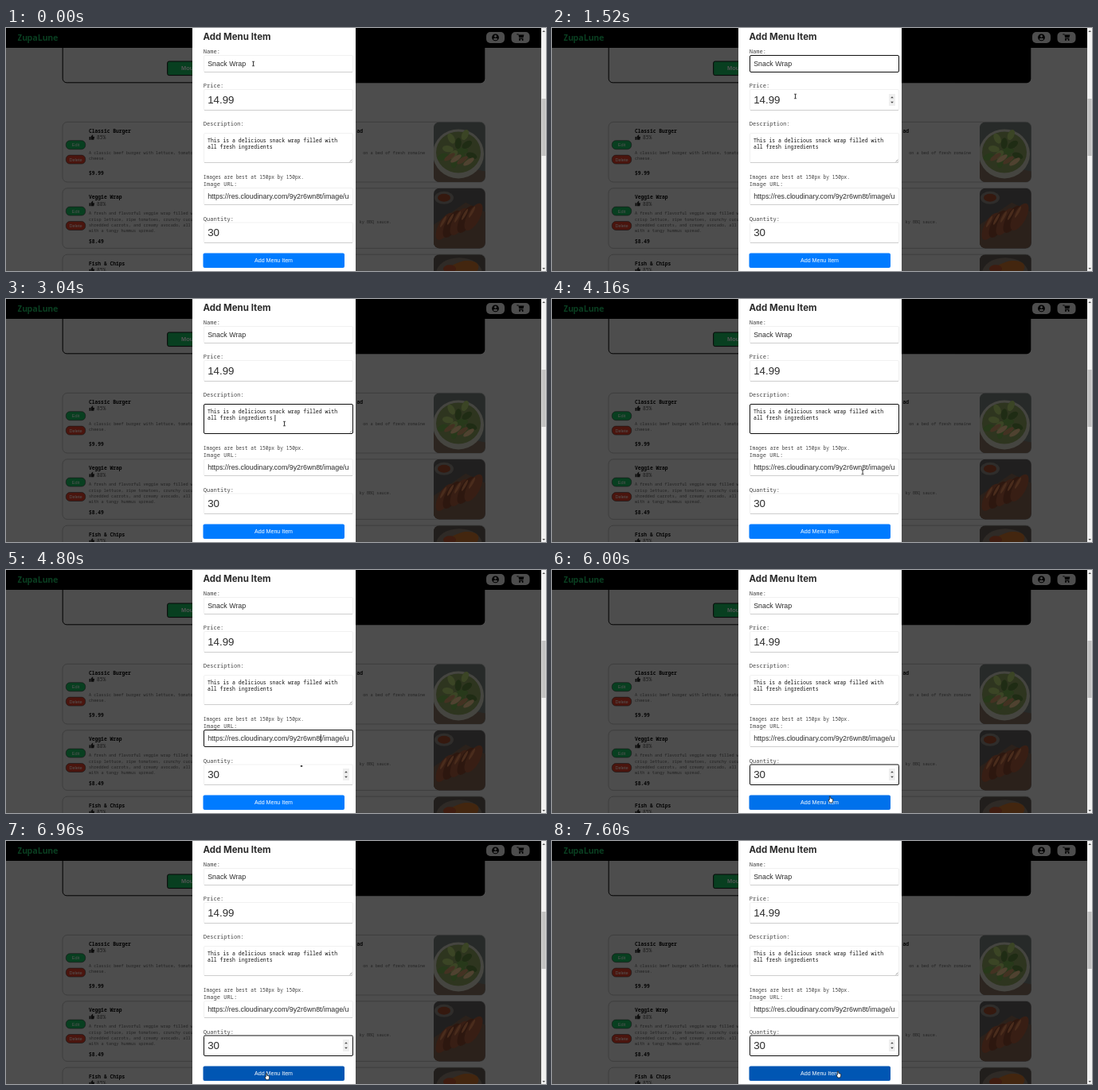
Animation, 678 px wide and 306 px high, one loop 8 s. Source, as an HTML page with a canvas:

```html
<!DOCTYPE html>
<html lang="en">
<head>
<meta charset="utf-8">
<title>Add Menu Item</title>
<style>
html, body { margin: 0; width: 100%; height: 100%; overflow: hidden; background: #4d4d4d; }
canvas { display: block; width: 678px; height: 306px; }
</style>
</head>
<body>
<canvas id="stage" width="678" height="306"></canvas>
<script>
const LOOP = 8000, STEP = 80;
const MONO = '"Noto Sans Mono", "DejaVu Sans Mono", monospace';
const SANS = '"Liberation Sans", Arial, sans-serif';
const DIM = '#4d4d4d', INK = '#040404', SOFT = '#222', GREEN = '#083f20', RED = '#4a150e';
const ctx = document.getElementById('stage').getContext('2d');

function rect(x, y, w, h, color) {
  ctx.fillStyle = color;
  ctx.fillRect(x, y, w, h);
}

function roundRect(x, y, w, h, r, fill, stroke, line = 1) {
  ctx.beginPath();
  ctx.roundRect(x, y, w, h, r);
  if (fill) { ctx.fillStyle = fill; ctx.fill(); }
  if (stroke) { ctx.strokeStyle = stroke; ctx.lineWidth = line; ctx.stroke(); }
}

function ellipse(x, y, rx, ry, color, turn = 0) {
  ctx.beginPath();
  ctx.ellipse(x, y, rx, ry, turn, 0, Math.PI * 2);
  ctx.fillStyle = color;
  ctx.fill();
}

function poly(points, color) {
  ctx.beginPath();
  points.forEach(([x, y]) => ctx.lineTo(x, y));
  ctx.closePath();
  ctx.fillStyle = color;
  ctx.fill();
}

function text(str, x, y, size, family, color, weight = 400, align = 'left') {
  ctx.font = `${weight} ${size}px ${family}`;
  ctx.textAlign = align;
  ctx.fillStyle = color;
  ctx.fillText(str, x, y);
}

function arrow(x, y, w, h, color) {
  poly([[x - w, y + h], [x + w, y + h], [x, y - h]], color);
}

// ---- dimmed page behind the dialog ----

const cards = [
  { name: 'Classic Burger', score: '85%', price: '$9.99',
    lines: ['A classic beef burger with lettuce, tomato, and', 'cheese.'],
    title: 'ad', tail: 'on a bed of fresh romaine', end: 526, tailY: 158.5 },
  { name: 'Veggie Wrap', score: '88%', price: '$8.49',
    lines: ['A fresh and flavorful veggie wrap filled with',
            'crisp lettuce, ripe tomatoes, crunchy cucumbers,',
            'shredded carrots, and creamy avocado, all topped',
            'with a tangy hummus spread.'],
    title: '', tail: 'ky BBQ sauce.', end: 484, tailY: 245.5 },
  { name: 'Fish & Chips', score: '85%', price: '', lines: [], title: '', tail: '' }
];

function thumbUp(x, y) {
  rect(x, y + 2.2, 1.5, 3.8, '#0c0c0c');
  poly([[x + 2, y + 2.2], [x + 4, y - 0.4], [x + 4.9, y + 0.3], [x + 4.4, y + 2],
        [x + 6.6, y + 2.2], [x + 5.8, y + 6], [x + 2, y + 6]], '#0c0c0c');
}

function pill(label, y, color) {
  roundRect(75.3, y, 24.4, 11, 5, color, '#161616', 0.6);
  text(label, 87.5, y + 7.6, 5.6, SANS, '#555', 400, 'center');
}

function salad(x, y) {
  rect(x, y, 65, 76, '#272a29');
  poly([[x, y + 50], [x + 65, y + 62], [x + 65, y + 76], [x, y + 76]], '#2c2520');
  ellipse(x + 31, y + 40, 32, 31, '#454540');
  ellipse(x + 31, y + 38, 28, 26, '#2e351f');
  for (let i = 0; i < 11; i++) {
    const a = i * 2.4, r = 6 + i * 1.6;
    ellipse(x + 30 + r * Math.cos(a), y + 36 + r * Math.sin(a), 7, 4,
            ['#27391a', '#3b4525', '#1f2c14'][i % 3], a);
  }
  for (let i = 0; i < 4; i++) ellipse(x + 20 + i * 8, y + 44 + i * 2, 8, 3, i % 2 ? '#4f4230' : '#433222', -0.6);
}

function ribs(x, y) {
  rect(x, y, 65, 76, '#201f1f');
  poly([[x, y + 46], [x + 40, y + 18], [x + 65, y + 30], [x + 65, y + 76], [x, y + 76]], '#2b211b');
  for (let i = 0; i < 5; i++) {
    ellipse(x + 14 + i * 9, y + 48 - i * 3, 8, 19, i % 2 ? '#2d170f' : '#381e14', 0.5);
    ellipse(x + 12 + i * 9, y + 42 - i * 3, 1.6, 8, '#4a2c1c', 0.5);
  }
  ellipse(x + 13, y + 12, 12, 8, '#2f2d2b');
  ellipse(x + 13, y + 12, 8, 5, '#35190f');
}

function fish(x, y) {
  rect(x, y, 65, 76, '#211e1c');
  ellipse(x + 32, y + 24, 29, 20, '#2f2a26');
  ellipse(x + 36, y + 20, 21, 11, '#43260f', -0.3);
  ellipse(x + 20, y + 18, 8, 5, '#3f1c10');
}

const photos = [salad, ribs, fish];

function card(c, i) {
  const y = 118.4 + i * 83.4;
  roundRect(71, y, 262, 75.6, 6, null, '#3a3a3a', 0.8);
  roundRect(340, y, 261.5, 75.6, 6, null, '#3a3a3a', 0.8);
  text(c.name, 104, y + 13.3, 6.3, MONO, INK, 700);
  thumbUp(104.5, y + 16.4);
  text(c.score, 114, y + 21.8, 6.3, MONO, '#1a1a1a');
  pill('Edit', y + 23.3, GREEN);
  pill('Delete', y + 41.7, RED);
  const top = i ? y + 33.6 : y + 40.4;
  c.lines.forEach((line, n) => text(line, 104, top + n * 7.1, 5.2, MONO, SOFT));
  text(c.price, 104, y + (i ? 69.5 : 67), 6.3, MONO, INK, 700);
  text(c.title, 448, y + 13.3, 6.3, MONO, INK, 700, 'right');
  text(c.tail, c.end, c.tailY || 0, 5.2, MONO, SOFT, 400, 'right');
  ctx.save();
  ctx.beginPath();
  ctx.roundRect(537, y, 64.6, 75.6, 7);
  ctx.clip();
  photos[i](537, y);
  ctx.restore();
}

function header() {
  rect(0, 0, 672, 25, '#000');
  text('ZupaLune', 14, 16.4, 10.7, MONO, '#0a3f21', 700);
  roundRect(603, 5, 23, 14, 5, DIM);
  roundRect(634.5, 5, 23, 14, 5, DIM);
  ellipse(614.5, 11.8, 4.4, 4.4, '#000');
  ellipse(614.5, 10.3, 1.5, 1.5, DIM);
  ellipse(614.5, 14, 2.6, 1.3, DIM);
  poly([[643.4, 8.6], [650.4, 8.6], [649.4, 12.3], [644.2, 12.3]], '#000');
  rect(641.4, 7.5, 2.2, 1, '#000');
  rect(644, 13, 5.4, 0.9, '#000');
  ellipse(645, 15, 1, 1, '#000');
  ellipse(648.6, 15, 1, 1, '#000');
}

function scrollbar() {
  rect(672, 0, 6, 306, '#f1f1f1');
  rect(672.6, 89, 5, 72, '#c1c1c1');
  arrow(675.2, 4, 1.8, 1, '#505050');
  arrow(675.2, 303, 1.8, -1, '#505050');
}

function page() {
  rect(0, 0, 678, 306, DIM);
  roundRect(71.2, 10, 529.6, 58.8, 5, DIM, '#000', 1);
  roundRect(336, 10, 265, 59, [0, 0, 5, 0], '#000');
  roundRect(202.7, 42, 60, 17.6, 2, GREEN, '#060606', 1);
  text('Mou', 220, 53.4, 7.4, SANS, '#555', 700);
  cards.forEach(card);
  header();
  scrollbar();
}

// ---- dialog ----

const fields = {
  name: { y: 34, h: 22 },
  price: { y: 77, h: 27 },
  about: { y: 132, h: 38 },
  url: { y: 201, h: 22 },
  count: { y: 244.5, h: 26.5 }
};

const focusTimes = [[800, 'name'], [2640, 'about'], [4320, 'url'], [5440, 'count']];
const carets = { name: [301.8, 40, 9], about: [337.5, 146, 8], url: [394.8, 207, 10], count: [268.8, 251, 13] };

function field({ y, h }, focused) {
  if (focused) {
    roundRect(248.5, y + 0.5, 187, h - 1, 1.5, '#fff', '#101010');
  } else {
    roundRect(248.5, y + 0.5, 187, h - 1, 1.5, '#fff', '#eee', 0.8);
    rect(249, y + h - 1, 186, 0.8, '#c6c6c6');
  }
}

function spinner(y) {
  rect(423, y, 8, 15, '#efefef');
  arrow(427, y + 4.2, 1.9, 1, '#444');
  arrow(427, y + 10.8, 1.9, -1, '#444');
}

function dialog(t, cursor) {
  const active = focusTimes.filter(f => t >= f[0]).pop() || [0, ''];
  const [since, focus] = active;
  const label = (s, y, size = 7.07) => text(s, 247.8, y, size, MONO, '#444');
  const value = (s, y, size) => text(s, 253.2, y, size, SANS, '#2b2b2b');

  rect(234, 0, 205, 306, '#fff');
  text('Add Menu Item', 247.5, 15, 11.5, 'Inter, sans-serif', '#2b2b2b', 700);
  label('Name:', 32);
  label('Price:', 75);
  label('Description:', 123.4);
  label('Images are best at 150px by 150px.', 190.4, 6.2);
  label('Image URL:', 199.4);
  label('Quantity:', 242.6);
  for (const key in fields) field(fields[key], key === focus);

  value('Snack Wrap', 48, 8.85);
  value('14.99', 95, 13.3);
  text('This is a delicious snack wrap filled with', 253, 143.8, 6.48, MONO, '#111');
  text('all fresh ingredients', 253, 152, 6.48, MONO, '#111');
  ctx.save();
  ctx.beginPath();
  ctx.rect(252, 203, 179, 18);
  ctx.clip();
  value('https://res.cloudinary.com/9y2r6wn8t/image/upload', 215.2, 8.85);
  ctx.restore();
  value('30', 262.4, 13.3);

  ctx.strokeStyle = '#777';
  ctx.lineWidth = 0.6;
  ctx.beginPath();
  ctx.moveTo(431.5, 168.5); ctx.lineTo(434.5, 165.5);
  ctx.moveTo(433.2, 168.5); ctx.lineTo(434.5, 167.2);
  ctx.stroke();

  const over = f => cursor.y >= f.y && cursor.y <= f.y + f.h;
  if (over(fields.price)) spinner(83);
  if (focus === 'count' || over(fields.count)) spinner(250);

  const blink = (t - since) % 1000 < 500 && !(focus === 'count' && t > 5900);
  if (focus && blink) {
    const [x, y, h] = carets[focus];
    rect(x, y, 0.8, h, '#111');
  }

  const k = Math.min(1, Math.max(0, (t - 5920) / 300));
  roundRect(247.5, 283.4, 177.5, 18.6, 2,
            `rgb(0, ${Math.round(123 - 37 * k)}, ${Math.round(255 - 76 * k)})`);
  text('Add Menu Item', 336, 295.4, 7.08, SANS, '#fff', 400, 'center');
}

// ---- pointer ----

const path = [
  [0, 310.5, 45], [80, 308.5, 43], [400, 308.5, 43], [480, 306, 45], [1200, 304, 46],
  [1520, 305.5, 86], [1920, 305.5, 86], [2640, 337, 157], [2720, 337, 157], [2800, 349.5, 157],
  [3040, 349.5, 157], [3600, 346, 221], [3760, 346, 221], [3920, 390, 218], [4160, 390, 218],
  [4320, 395, 213], [4640, 395, 213], [4800, 371, 247], [5200, 349, 258], [5600, 349, 258],
  [6000, 350, 289], [6240, 334, 292], [6320, 325, 292], [6720, 335, 298], [7120, 324, 296],
  [7600, 360, 294], [LOOP, 360, 294]
];

function pointerAt(t) {
  const i = path.findIndex(p => p[0] > t);
  const [t0, x0, y0] = path[i - 1], [t1, x1, y1] = path[i];
  const u = (t - t0) / (t1 - t0), e = u * u * (3 - 2 * u);
  return { x: x0 + (x1 - x0) * e, y: y0 + (y1 - y0) * e };
}

function beam(x, y) {
  rect(x - 0.4, y - 2.8, 0.9, 5.6, '#222');
  rect(x - 1.6, y - 3.2, 3.2, 0.8, '#333');
  rect(x - 1.6, y + 2.4, 3.2, 0.8, '#333');
}

function hand(x, y) {
  ctx.save();
  ctx.translate(x, y);
  ctx.beginPath();
  [[-1.6, -4], [-0.4, -4], [-0.2, -1.4], [2.8, -0.6], [2.6, 2], [1.8, 4], [-1.2, 4], [-3, 0.6], [-1.6, 0.4]]
    .forEach(([px, py]) => ctx.lineTo(px, py));
  ctx.closePath();
  ctx.fillStyle = '#fff';
  ctx.strokeStyle = '#111';
  ctx.lineWidth = 0.7;
  ctx.fill();
  ctx.stroke();
  ctx.restore();
}

function pointer({ x, y }) {
  const { y: top, h } = fields.count;
  if (y > 283) hand(x, y);
  else if (y > top && y < top + h / 4) rect(x - 1.2, y - 0.8, 2.4, 1.5, '#111');
  else beam(x, y);
}

function draw(now) {
  const t = Math.floor((now % LOOP) / STEP) * STEP;
  const cursor = pointerAt(t);
  page();
  dialog(t, cursor);
  pointer(cursor);
}

const start = performance.now();
function tick() {
  draw(performance.now() - start);
  requestAnimationFrame(tick);
}
tick();
</script>
</body>
</html>
```
